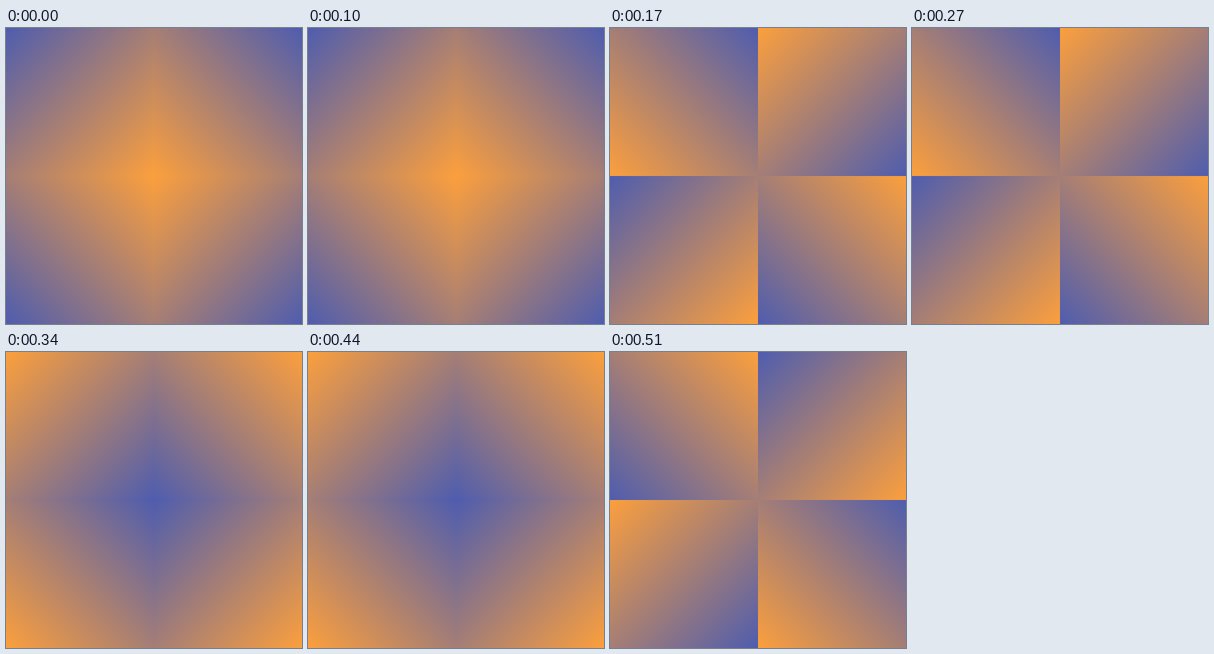
An HTML page that plays this animation: 400x400 px, repeating every 680 ms.

```html
<!DOCTYPE html>
<html lang="en">
<head>
<meta charset="utf-8">
<title>Turning gradient tiles</title>
<style>
  html, body { margin: 0; width: 100%; height: 100%; overflow: hidden; }
  svg { display: block; width: 100vw; height: 100vh; }
</style>
</head>
<body>
<svg id="stage" viewBox="0 0 400 400" shape-rendering="crispEdges"></svg>
<script>
const NS = "http://www.w3.org/2000/svg";
const WARM = "#fb9f3d", COOL = "#4f5dae";
const STEP = 170, SIZE = 200;
// Tile corners in clockwise order
const CORNERS = [[0, 0], [1, 0], [1, 1], [0, 1]];

const stage = document.getElementById("stage");

function add(parent, name, attrs) {
  const el = document.createElementNS(NS, name);
  setAttrs(el, attrs);
  return parent.appendChild(el);
}

function setAttrs(el, attrs) {
  for (const key in attrs) el.setAttribute(key, attrs[key]);
}

// One tile per quadrant, each with its own gradient
const gradients = CORNERS.map(([col, row], i) => {
  const gradient = add(stage, "linearGradient", { id: "tile" + i });
  add(gradient, "stop", { offset: 0, "stop-color": WARM });
  add(gradient, "stop", { offset: 1, "stop-color": COOL });
  add(stage, "rect", {
    x: col * SIZE, y: row * SIZE, width: SIZE, height: SIZE,
    fill: `url(#tile${i})`
  });
  return gradient;
});

// The warm corner starts at the stage centre and turns clockwise in quarters
function draw(time) {
  const turn = Math.floor(time / STEP) % 4;
  gradients.forEach((gradient, i) => {
    const [x1, y1] = CORNERS[(i + 2 + turn) % 4];
    setAttrs(gradient, { x1, y1, x2: 1 - x1, y2: 1 - y1 });
  });
}

const start = performance.now();
function tick() {
  draw(performance.now() - start);
  requestAnimationFrame(tick);
}
tick();
</script>
</body>
</html>
```
